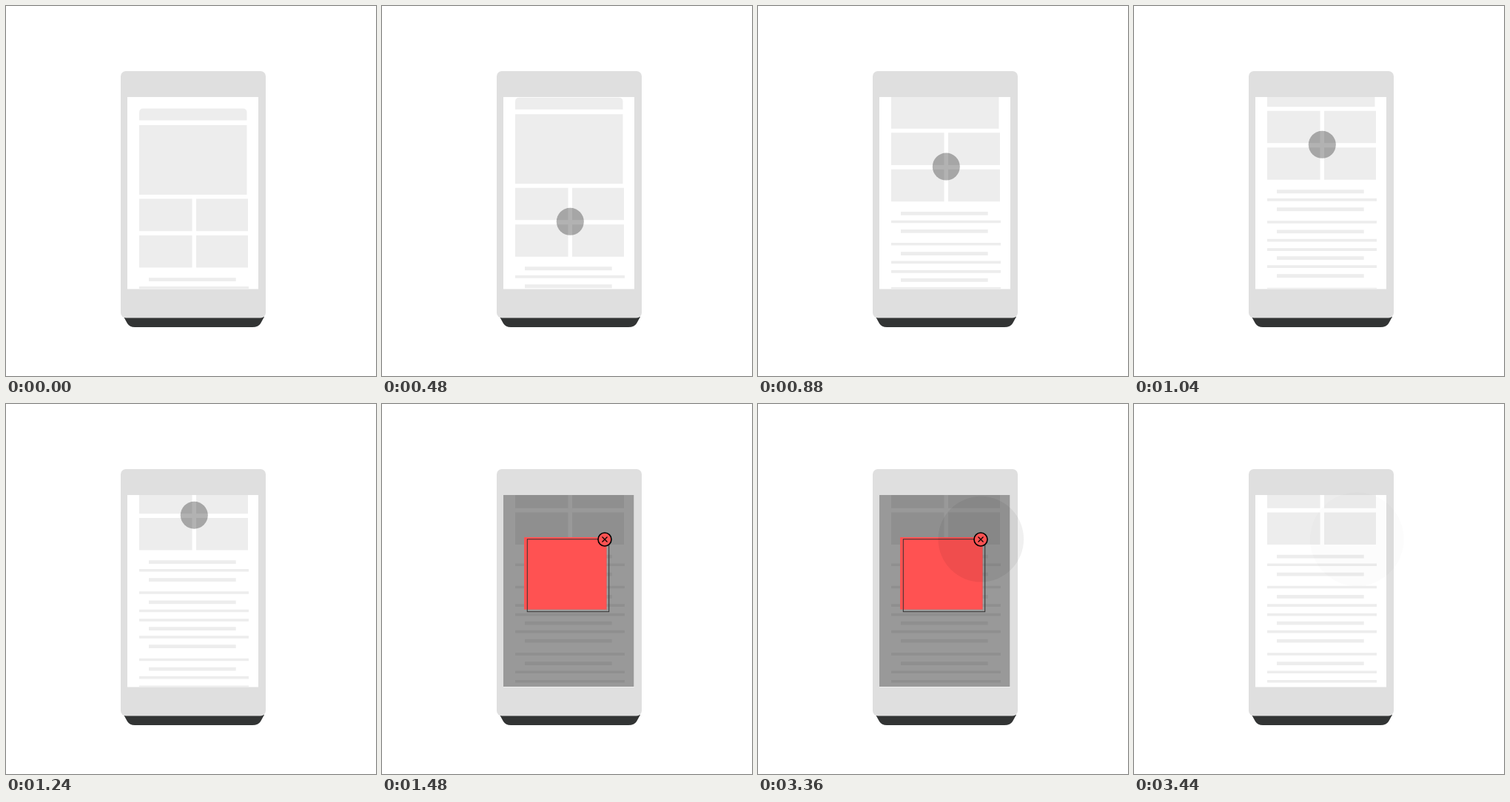
These frames come from a looping animation (500 px wide and 500 px high, 5800 ms). An HTML page:

```html
<!DOCTYPE html>
<html lang="en">
<head>
<meta charset="utf-8">
<title>Phone popup</title>
<style>
  html, body { margin: 0; width: 100%; height: 100%; overflow: hidden; background: #fff; }
  svg { display: block; width: 100%; height: 100%; }
</style>
</head>
<body>
<svg viewBox="0 0 500 500">
  <clipPath id="screen"><rect x="164" y="123" width="177" height="259.5"/></clipPath>

  <path fill="#323434" d="M159 420L164 429Q167 434 174 434H333Q341 434 344 429L349 420Z"/>
  <rect x="155" y="88" width="196" height="333.5" rx="7" fill="#dfdfdf"/>
  <rect x="164" y="123" width="177" height="259.5" fill="#fff"/>

  <g clip-path="url(#screen)">
    <g id="page" fill="#ededed">
      <path d="M180 154.5V144Q180 138.5 185.5 138.5H320Q325.5 138.5 325.5 144V154.5Z"/>
      <path d="M180 161H325.5V255H180Z"/>
      <path d="M180 260.5H251.5V304.2H180ZM257 260.5H327V304.2H257Z"/>
      <path d="M180 310H251.5V353.5H180ZM257 310H327V353.5H257Z"/>
      <path id="short" stroke="#ededed" stroke-width="4.8"/>
      <path id="long" stroke="#ededed" stroke-width="3.6"/>
    </g>
  </g>

  <g id="popup">
    <rect x="164" y="123" width="176.5" height="259" opacity=".4"/>
    <rect x="192" y="180" width="111.5" height="97.7" fill="#ff5252"/>
    <rect x="196.3" y="182.7" width="110.4" height="98" fill="none" stroke="#333"/>
  </g>
  <circle id="touch"/>
  <g id="close" stroke="#000">
    <circle cx="301" cy="183" r="9" fill="#ff5252" stroke-width="1.6"/>
    <path d="M297.5 179.5L304.5 186.5M304.5 179.5L297.5 186.5" stroke-width="1.2"/>
  </g>
</svg>
<script>
const LOOP = 5800, STEP = 40, RADIUS = 18.5, ALPHA = 0.3, SCROLL = 163.4;
const $ = id => document.getElementById(id);
const [page, popup, touch, close] = ['page', 'popup', 'touch', 'close'].map($);

// progress from 0 to 1 between two times
const ramp = (t, from, to) => Math.min(1, Math.max(0, (t - from) / (to - from)));

const rules = (x1, x2, ys) => ys.map(y => `M${x1} ${y}H${x2}`).join('');
$('short').setAttribute('d', rules(193, 310.7, [369.6, 393.6, 423.8, 459.5, 483.6, 514]));
$('long').setAttribute('d', rules(180, 328, [380.7, 410.9, 435.5, 448, 471, 501.4, 525.6, 538.2]));

function setTouch(x, y, r, alpha) {
  touch.setAttribute('cx', x);
  touch.setAttribute('cy', y);
  touch.setAttribute('r', r);
  touch.setAttribute('opacity', alpha);
}

function draw(t) {
  const scroll = SCROLL * ramp(t, 400, 1280);
  page.setAttribute('transform', `translate(0 ${-scroll})`);

  const open = t >= 1360 && t < 3400;
  for (const part of [popup, close]) part.setAttribute('display', open ? 'inline' : 'none');

  if (t < 2000) {
    // finger drags the page up
    const size = ramp(t, 240, 340) * (1 - ramp(t, 1375, 1480));
    setTouch(254.3, 306.2 - scroll, RADIUS * size, ALPHA);
  } else {
    // tap on the close button, the ripple stops while barely visible
    const p = ramp(Math.min(t, 3440), 2960, 3460);
    const spread = 46 * (1 - (1 - p) ** 1.2);
    setTouch(301.3, 182.7, RADIUS * ramp(t, 2840, 2940) + spread, ALPHA * (1 - p));
  }
}

const start = performance.now();
function frame() {
  const t = (performance.now() - start) % LOOP;
  draw(Math.floor(t / STEP) * STEP);
  requestAnimationFrame(frame);
}
frame();
</script>
</body>
</html>
```
